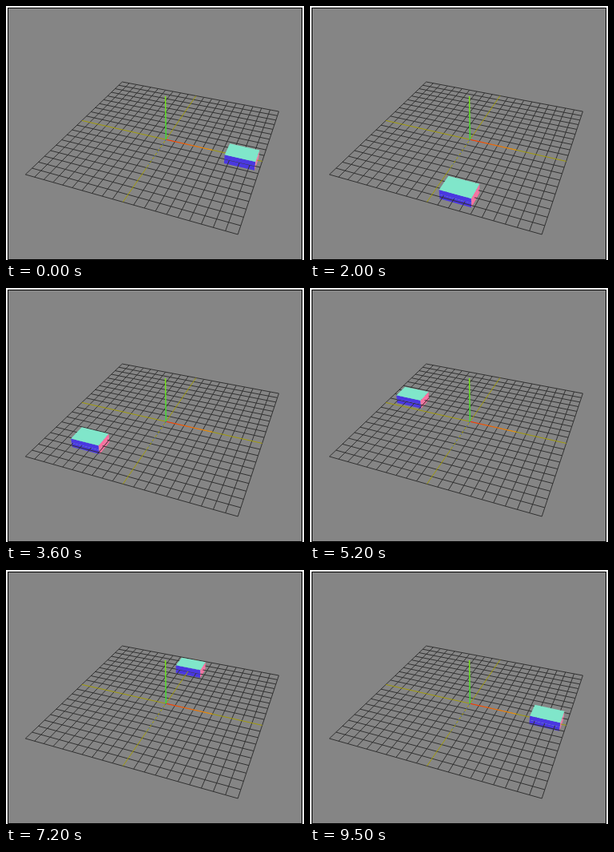
An HTML page with a canvas that plays this animation: 373 px wide and 318 px high, repeating every 9600 ms.

```html
<!DOCTYPE html>
<html>
<head>
<meta charset="utf-8">
<style>
  html, body { margin: 0; width: 100%; height: 100%; overflow: hidden; background: #fff; }
  canvas { display: block; }
</style>
</head>
<body>
<canvas id="stage" width="373" height="318"></canvas>
<script>
const ctx = document.getElementById('stage').getContext('2d');
const STEP = 100, STEPS = 96, RADIUS = 8, HALF_GRID = 10;

// Perspective projection; one world unit is one grid cell, y points up.
function project(x, y, z) {
  const w = 1 - 0.006747 * x - 0.01206 * y - 0.01766 * z;
  return [
    (200.2 + 9.885 * x - 2.54 * y - 7.968 * z) / w,
    (167.2 + 1.411 * x - 12.2 * y + 3.488 * z) / w
  ];
}

function line(from, to, color, endColor, dash = []) {
  const a = project(...from), b = project(...to);
  const paint = ctx.createLinearGradient(...a, ...b);
  paint.addColorStop(0, color);
  paint.addColorStop(1, endColor || color);
  ctx.strokeStyle = paint;
  ctx.setLineDash(dash);
  ctx.beginPath();
  ctx.moveTo(...a);
  ctx.lineTo(...b);
  ctx.stroke();
  ctx.setLineDash([]);
}

function face(color, ...corners) {
  ctx.fillStyle = color;
  ctx.beginPath();
  for (const c of corners) ctx.lineTo(...project(...c));
  ctx.fill();
}

function slab(cx, cz, bottom, top) {
  const l = cx - 1.5, r = cx + 1.5, b = cz - 1, f = cz + 1;
  face('#4a38e0', [l, top, f], [r, top, f], [r, bottom, f], [l, bottom, f]);
  face('#ff6fa0', [r, top, f], [r, top, b], [r, bottom, b], [r, bottom, f]);
  face('#80e6ca', [l, top, b], [r, top, b], [r, top, f], [l, top, f]);
}

function grid() {
  const n = HALF_GRID, dark = '#303030', olive = '#a09a08';
  for (let i = -n; i <= n; i++) {
    if (!i) continue;
    line([i, 0, -n], [i, 0, n], dark);
    line([-n, 0, i], [n, 0, i], dark);
  }
  line([0, 0, -n], [0, 0, n], olive);
  line([-n, 0, 0], [n, 0, 0], olive);
  line([0, 0, 0], [5, 0, 0], '#ff2010', '#f09010');
  line([0, 0, 0], [0, 0, 5], '#3040d8', '#4070c0', [2, 4]);
}

function draw(now) {
  const angle = Math.floor(now / STEP) % STEPS / STEPS * 2 * Math.PI;
  const x = RADIUS * Math.cos(angle), z = RADIUS * Math.sin(angle);

  ctx.fillStyle = '#fff';
  ctx.fillRect(0, 0, 373, 318);
  ctx.fillStyle = '#858585';
  ctx.fillRect(2, 2, 369, 316);
  ctx.strokeStyle = '#000';
  ctx.lineWidth = 1;
  ctx.strokeRect(2.5, 2.5, 368, 315);

  // The box straddles the ground, so the grid lies over its lower half.
  slab(x, z, -0.5, 0);
  grid();
  slab(x, z, 0, 0.5);
  ctx.lineWidth = 1.4;
  line([0, 0, 0], [0, 5, 0], '#30e030', '#80e818');
}

const start = performance.now();
function tick() {
  draw(performance.now() - start);
  requestAnimationFrame(tick);
}
tick();
</script>
</body>
</html>
```
